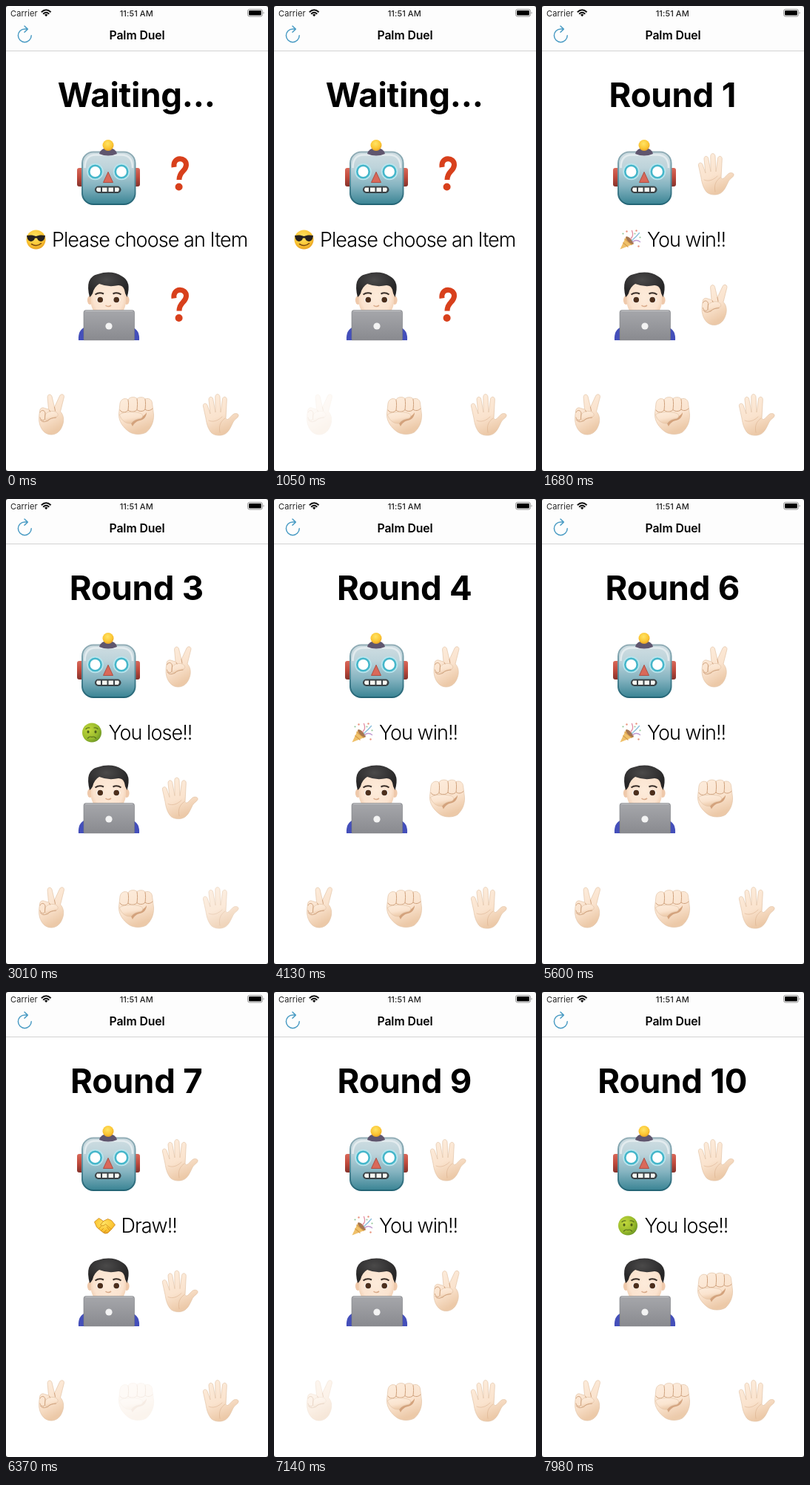
Recreate the animation shown at these times as an HTML page. Size 354 px wide and 626 px high, loop 8 s.

```html
<!DOCTYPE html>
<html lang="en">
<head>
<meta charset="utf-8">
<title>Palm Duel</title>
<style>
  html, body { margin: 0; width: 100%; height: 100%; overflow: hidden; background: #fff; }
  svg { display: block; width: 100%; height: 100%; }
  text { font-family: Inter, Roboto, sans-serif; fill: #000; }
  .mid { text-anchor: middle; }
  .status { font-size: 11px; letter-spacing: .1px; fill: #222; }
  .nav { font-size: 15.8px; font-weight: 600; letter-spacing: -.1px; }
  .round { font-size: 45.5px; font-weight: 700; letter-spacing: -.2px; }
  .note { font-size: 27px; font-weight: 300; letter-spacing: -.95px; }
  .skin { fill: url(#skin); stroke: #e3c4a8; stroke-width: .7; stroke-linejoin: round; }
  .fold { fill: none; stroke: #cfa17c; stroke-width: 1; stroke-linecap: round; }
</style>
</head>
<body>
<svg viewBox="0 0 354 626">
  <defs>
    <linearGradient id="skin" x1="0" y1="0" x2=".35" y2="1">
      <stop offset="0" stop-color="#fdeddd"/><stop offset=".6" stop-color="#fae3ce"/><stop offset="1" stop-color="#ecc9a8"/>
    </linearGradient>
    <linearGradient id="steel" x1="0" y1="0" x2="0" y2="1">
      <stop offset="0" stop-color="#cfdde2"/><stop offset=".3" stop-color="#bdd3da"/>
      <stop offset=".65" stop-color="#84b3c0"/><stop offset="1" stop-color="#3a8494"/>
    </linearGradient>
    <linearGradient id="rim" x1="0" y1="0" x2="0" y2="1">
      <stop offset="0" stop-color="#93aeb7"/><stop offset=".5" stop-color="#5b919f"/><stop offset="1" stop-color="#236475"/>
    </linearGradient>
    <linearGradient id="red" x1="0" y1="0" x2="0" y2="1">
      <stop offset="0" stop-color="#d9695a"/><stop offset=".5" stop-color="#c04a3c"/><stop offset="1" stop-color="#86332c"/>
    </linearGradient>
    <linearGradient id="lid" x1="0" y1="0" x2="0" y2="1">
      <stop offset="0" stop-color="#a6a7ab"/><stop offset="1" stop-color="#88898e"/>
    </linearGradient>
    <radialGradient id="face" cx=".5" cy=".5" r=".6">
      <stop offset="0" stop-color="#fdebda"/><stop offset=".7" stop-color="#fbe3cf"/><stop offset="1" stop-color="#edc8a9"/>
    </radialGradient>
    <radialGradient id="hair" cx=".45" cy=".3" r=".6">
      <stop offset="0" stop-color="#4b4a4a"/><stop offset="1" stop-color="#262526"/>
    </radialGradient>
    <radialGradient id="gold" cx=".45" cy=".35" r=".75">
      <stop offset="0" stop-color="#ffe465"/><stop offset=".6" stop-color="#fbc532"/><stop offset="1" stop-color="#df9220"/>
    </radialGradient>
    <radialGradient id="green" cx=".35" cy=".35" r=".8">
      <stop offset="0" stop-color="#c3d83c"/><stop offset=".6" stop-color="#98ba2c"/><stop offset="1" stop-color="#5d8a22"/>
    </radialGradient>

    <g id="hand0">
      <path class="skin" d="M1 24C1 19 5 18 8 19.5L13 21 11.6 5C11.5 0 16.8 0 17.6 4L21 18 28 3C30-1 35 1 33.8 5L29 24C33 28 34.5 35 32 42 29.5 50 24 55 16.5 55 8 55 3 48 1 41 -.5 36 0 29 1 24Z"/>
      <path class="skin" d="M8 31C8 25 16 22 22 24 27 26 27 31 22 32 18 32.5 15 33.5 12 37 9 37 7.5 34 8 31Z"/>
      <path class="fold" d="M1.5 25C3 21 8 22 8.5 26L8 34C7 37 2 36 1.5 32M2 35C4 39 9 38 12 36 15 33 19 32.5 23 32M21 18 22 23M14 22 15 24"/>
    </g>
    <g id="hand1">
      <path class="skin" d="M2 9C3 3 9 1 13 4 15 0 22-.5 25 2.5 28 0 34 0 36 3 40 1.5 44.5 3 45.5 8L47.5 24C48 34 44 42 38 47.5 32 51.5 20 51.5 14 47 6 41 0 33 .5 23Z"/>
      <path class="fold" d="M13 4.5C14 9 13.5 14 13 18M25 3C26 8 25.5 13 25 17.5M36 3.5C37 8 36.5 13 36 17"/>
      <path class="fold" d="M2 18C4 22 10 22 13 18 16 21 22 21 25 17.5 28 20.5 34 20 36 17 39 19.5 43 19 46 16"/>
      <path d="M16 34C21 30 27 31 32 27 35 25 37 23 38 21 38 27 34 31 29 32 24 33 21 36 19 40Z" fill="#d3a27c"/>
      <path class="skin" d="M1.5 24C7 20 21 20 29 22 34 23.5 34 28.5 29 29.5 24 30 20 32 17 36 10 37 3 31 1.5 24Z"/>
    </g>
    <g id="hand2">
      <path class="skin" d="M13 53C8 48 6 40 5 33L1.5 17C.5 13 5.5 11.5 7 15.5L11 27 9 8C8.8 3.5 14 3 14.8 7.5L18 25 17.8 4C18-.5 23.5-.5 24 4L25 25 27.5 7C28.3 3 33.5 3.5 33.3 8L32 33C33 35 34.5 35 36 33.5L41.5 28C44.5 25.5 50 26.5 49 30 48 33 44 34 42 38 39 44 37 50 32 53.5 27 57 18 57 13 53Z"/>
      <path class="fold" opacity=".4" d="M31 33C25 37 22 43 24 52M9 36C15 39 22 36 27 31"/>
    </g>
    <g id="ask">
      <path d="M227 217C225 202 244 203 243.5 214 243 223 234 222 234 234" fill="none" stroke="#d8401c" stroke-width="7"/>
      <circle cx="233.6" cy="243.5" r="5" fill="#d8401c"/>
    </g>

    <g id="cool">
      <circle r="13" fill="url(#gold)"/>
      <path d="M-12.5-5.5C-8-6.5-3-6 0-4.5 3-6 8-6.5 12.5-5.5L12-3C11 4 3 4 1.5-2H-1.5C-3 4-11 4-12-3Z" fill="#26211f"/>
      <path d="M-6 6Q1 10.5 7 5" fill="none" stroke="#7b4a12" stroke-width="1.5" stroke-linecap="round"/>
    </g>
    <g id="sick">
      <circle r="13" fill="url(#green)"/>
      <path d="M-8-5Q-6-7-3-6.5M8-5Q6-7 3-6.5M-5.5 7.5Q-3 4.5 0 6 3 4.5 5.5 7.5" fill="none" stroke="#58701b" stroke-width="1.2" stroke-linecap="round"/>
      <g fill="#4d5f1a"><ellipse cx="-5" cy="-1" rx="1.5" ry="2"/><ellipse cx="5" cy="-1" rx="1.5" ry="2"/></g>
    </g>
    <g id="party">
      <path d="M-14 13-6-4Q2-1 4 6Z" fill="#efc06a"/>
      <path d="M-10 4-3 10M-8-1 2 7" stroke="#d9a04c" stroke-width="1.4"/>
      <ellipse cx="-1" cy="1" rx="2.6" ry="7" transform="rotate(-45 -1 1)" fill="#a5754f"/>
      <g fill="none" stroke-width="1.4" stroke-linecap="round">
        <path d="M0-1Q5-5 2-12" stroke="#e492a6"/><path d="M2 1Q8-4 12-9" stroke="#8dbfdc"/><path d="M3 3Q8-1 13 3" stroke="#bf9ad0"/>
      </g>
      <g fill="#e89580"><circle cx="-5" cy="-11" r="1.2"/><circle cx="8" cy="-12" r="1.2"/><circle cx="11" cy="9" r="1.2"/></g>
      <g fill="#93c596"><circle cx="-10" cy="-8" r="1.1"/><circle cx="13" cy="-3" r="1.1"/><circle cx="6" cy="-8" r="1"/></g>
    </g>
    <g id="shake" stroke="#c98316" stroke-width=".8" stroke-linejoin="round">
      <path d="M-14-5-8-10-2-6 4-9 9-7 14-1 9 5 4 10Q0 12-4 8L-11 2Z" fill="url(#gold)"/>
      <path d="M-2-6-6-1Q-3 2 1-2L9 5M-8 4-5 1M-5 7-2 4M-1 9 2 6M3 2 7 7" fill="none" stroke-linecap="round"/>
    </g>
  </defs>

  <rect width="354" height="626" fill="#fff"/>
  <rect width="354" height="60" fill="#fdfdfd"/>
  <rect y="60" width="354" height="1" fill="#d2d2d2"/>
  <path d="M0 0H3Q0 0 0 3ZM354 0V3Q354 0 351 0ZM0 626V623Q0 626 3 626ZM354 626H351Q354 626 354 623Z" fill="#333"/>

  <text class="status" x="6" y="13.5">Carrier</text>
  <g fill="none" stroke="#111" stroke-width="1.9">
    <path d="M47.8 8.3Q54.2 2.4 60.6 8.3M50.1 10.7Q54.2 6.9 58.3 10.7"/>
    <path d="M54.2 14.2 52 11.7Q54.2 10 56.4 11.7Z" fill="#111" stroke="none"/>
  </g>
  <text class="status mid" x="176.3" y="13.5" font-weight="500">11:51 AM</text>
  <rect x="326.5" y="4.5" width="20" height="9.5" rx="2.6" fill="none" stroke="#888" stroke-width=".9"/>
  <rect x="328" y="6" width="17" height="6.5" rx="1.3"/>
  <path d="M347.7 7.7Q349.6 9.2 347.7 10.8Z" fill="#888"/>

  <g fill="none" stroke="#4b9cc4" stroke-width="1.5" stroke-linecap="round" stroke-linejoin="round">
    <path d="M34.2 39.8A8.9 8.9 0 1 1 25.3 30.9H28.5M25 27 29.3 31.1 25 35.2"/>
  </g>
  <text class="nav mid" x="177" y="45">Palm Duel</text>
  <text class="round mid" id="title" x="176.3" y="136"></text>

  <!-- robot -->
  <g>
    <rect x="96" y="218" width="10" height="25" rx="3" fill="url(#red)"/>
    <rect x="171" y="218" width="10" height="25" rx="3" fill="url(#red)"/>
    <rect x="103" y="196.5" width="71.5" height="70.5" rx="15" fill="url(#steel)" stroke="url(#rim)" stroke-width="2"/>
    <path d="M106.5 218Q106.500 200.500 121 200.500H156Q171 200.500 171 218" fill="none" stroke="#eaf1f3" stroke-width="2.500" opacity=".8"/>
    <path d="M126 199Q128 191 138 191T150 199Q138 204 126 199Z" fill="#5f566e"/>
    <circle cx="138" cy="187.5" r="7.5" fill="url(#gold)"/>
    <g fill="#b9e4ec">
      <circle cx="120.5" cy="223" r="11.3"/><circle cx="156" cy="223" r="11.3"/>
    </g>
    <g fill="#fff" stroke="#45b6ca" stroke-width="2.6">
      <circle cx="120.5" cy="223" r="8.2"/><circle cx="156" cy="223" r="8.2"/>
    </g>
    <path d="M138 223.5 144.5 237.5H131.5Z" fill="#d9695a" stroke="#b04d42" stroke-linejoin="round"/>
    <rect x="120" y="242.5" width="35.5" height="9.5" rx="4.7" fill="#3a4246"/>
    <path d="M123 244.5H128V250H124Q122 249 122 247ZM130 244.5H136.5V250H130ZM138.5 244.5H145V250H138.5ZM147 244.5H152Q154 247 151.5 250H147Z" fill="#f7f7f2"/>
  </g>

  <!-- player -->
  <g>
    <path d="M98 450Q97 436 107 432H170Q181 436 180 450Z" fill="#444fba"/>
    <ellipse cx="113.5" cy="396" rx="3.6" ry="6" fill="#efc9ab"/><ellipse cx="163" cy="396" rx="3.6" ry="6" fill="#efc9ab"/>
    <path d="M114.500 380Q116 364 138 364T162 380V399Q160 419 138 420 117 419 114.500 399Z" fill="url(#face)"/>
    <path d="M113 392Q106 365 124 361 143 355 157 364 170 371 163.500 392 160.500 387 160 382 158 376 152 376 138 379 126 374 119 378 117 387 115.500 390 113 392Z" fill="url(#hair)"/>
    <path d="M120.500 388.500Q126 384.500 132 387.500M144.500 387.500Q150 384.500 155.500 388.500" fill="none" stroke="#3a2f29" stroke-width="2"/>
    <g fill="#fff"><ellipse cx="127" cy="395.500" rx="4.8" ry="4"/><ellipse cx="149.5" cy="395.500" rx="4.8" ry="4"/></g>
    <g fill="#4d2f1c"><circle cx="127.3" cy="395.500" r="3.8"/><circle cx="149.2" cy="395.500" r="3.8"/></g>
    <path d="M134.500 403Q138 406 142 403" fill="none" stroke="#d9ab8a" stroke-width="1.6"/>
    <rect x="105" y="409.500" width="68.500" height="42" rx="3" fill="url(#lid)" stroke="#77797e" stroke-width=".6"/>
    <path d="M107.500 410.400H171" stroke="#c4c5c8"/>
    <circle cx="139" cy="431" r="4.6" fill="#f3f3f3"/>
    <rect x="98" y="450.2" width="83" height="2" fill="#fff"/>
  </g>

  <use id="bot"/><use id="me"/>
  <use id="mood"/>
  <text class="note" id="note" y="324"></text>
  <use class="pick" href="#hand0" x="44.5" y="522"/>
  <use class="pick" href="#hand1" x="152" y="526"/>
  <use class="pick" href="#hand2" x="265" y="522"/>
</svg>
<script>
  const LOOP = 8000, HOLD = 140, FADE = 450, DIM = .2;
  const $ = id => document.getElementById(id);
  const picks = document.querySelectorAll('.pick');

  // [release time, player, robot]; 0 scissors, 1 rock, 2 paper
  const rounds = [
    [1120, 0, 2], [2000, 1, 1], [2800, 2, 0], [3570, 1, 0], [4370, 0, 1],
    [5090, 1, 0], [5810, 2, 2], [6440, 1, 0], [7070, 0, 2], [7630, 1, 2]
  ];
  // [emoji, its centre, text x, text], indexed by (player - robot) mod 3
  const results = [
    ['shake', 133.5, 155.5, 'Draw!!'],
    ['party', 119.5, 142, 'You win!!'],
    ['sick', 116, 138.5, 'You lose!!']
  ];
  const start = ['cool', 40.5, 62, 'Please choose an Item'];
  const spots = [[216, 198], [210, 201], [210, 198]];

  function place(el, id, x, y) {
    el.setAttribute('href', '#' + id);
    el.setAttribute('x', x);
    el.setAttribute('y', y);
  }

  function showHand(el, kind, dy) {
    if (kind === undefined) place(el, 'ask', 0, dy);
    else place(el, 'hand' + kind, spots[kind][0], spots[kind][1] + dy);
  }

  function alpha(dt) {
    if (dt < -HOLD || dt >= FADE) return 1;
    if (dt < 0) return Math.max(DIM, 1 - (dt + HOLD) / 60 * (1 - DIM));
    return 1 - (1 - DIM) * (1 - dt / FADE) ** 2;
  }

  let shown = -1;
  function showRound(n) {
    if (n === shown) return;
    shown = n;
    const [, me, bot] = n ? rounds[n - 1] : [];
    const [mood, cx, x, text] = n ? results[(me - bot + 3) % 3] : start;
    $('title').textContent = n ? 'Round ' + n : 'Waiting...';
    $('note').textContent = text;
    $('note').setAttribute('x', x);
    place($('mood'), mood, cx, 314.5);
    showHand($('bot'), bot, 0);
    showHand($('me'), me, 176.5);
  }

  function draw(t) {
    showRound(rounds.filter(r => t >= r[0]).length);
    picks.forEach((el, i) => {
      const mine = rounds.filter(r => r[1] === i).map(r => alpha(t - r[0]));
      el.setAttribute('opacity', Math.min(...mine));
    });
  }

  const t0 = performance.now();
  function tick() {
    draw((performance.now() - t0) % LOOP);
    requestAnimationFrame(tick);
  }
  tick();
</script>
</body>
</html>
```
